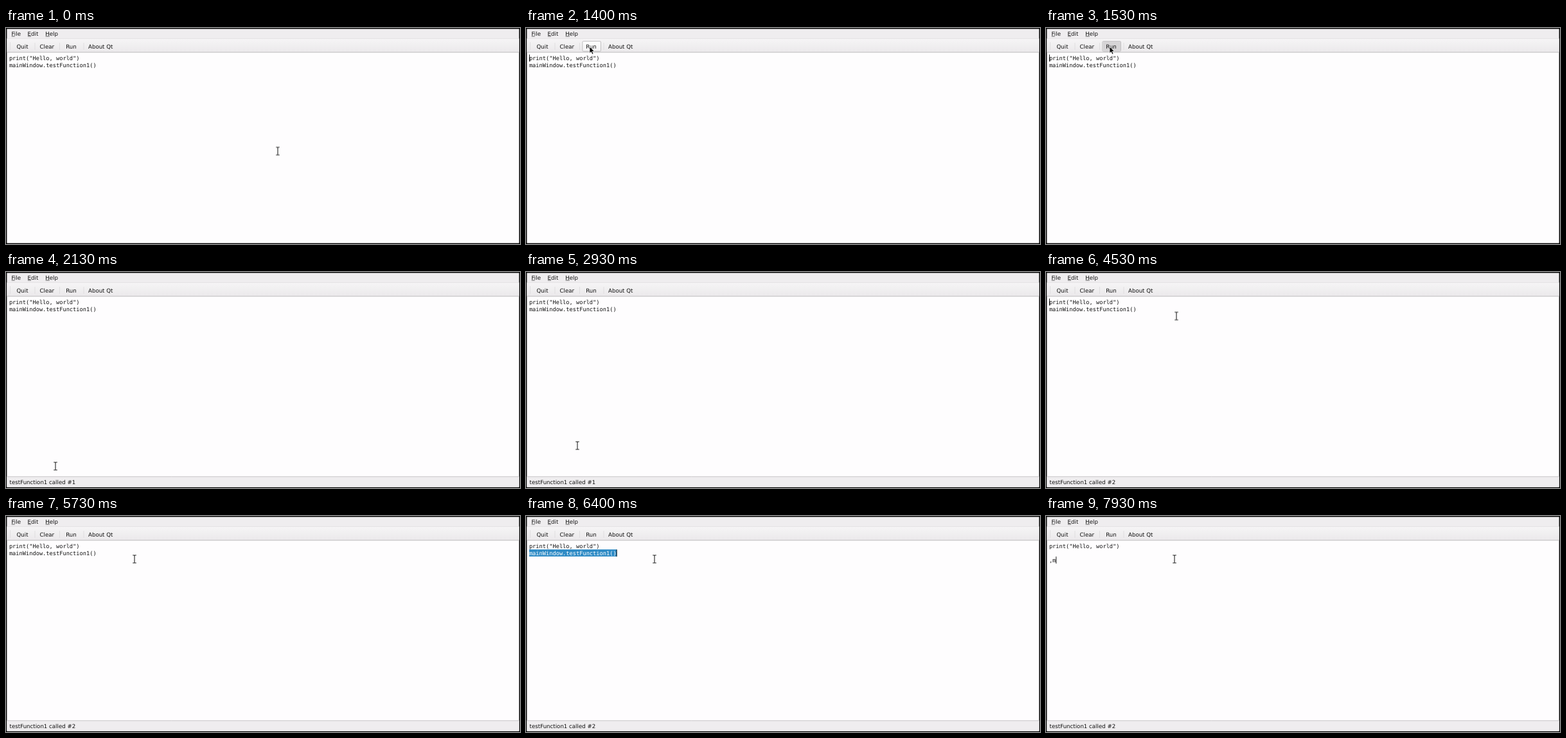
Animation, 800 px wide and 336 px high, one loop 8000 ms. Source, as an HTML page:

```html
<!DOCTYPE html>
<html lang="en">
<head>
<meta charset="utf-8">
<title>Script editor</title>
<style>
html, body { margin: 0; width: 100%; height: 100%; overflow: hidden; background: #000; }
svg { display: block; width: 100%; height: 100%; }
text { font: 8.65px "DejaVu Sans", sans-serif; text-rendering: geometricPrecision; white-space: pre; fill: #111; }
.code text { font: 8.69px "DejaVu Sans Mono", monospace; }
.code .picked { fill: #fff; }

/* Every part changes in hard steps on one 8 s clock. */
.anim { animation: 8s step-end infinite; }
#pointer { animation-name: pointer; }
#beam { animation-name: beam; }
#arrow { animation-name: arrow; }
#hover { animation-name: hover; }
#press { animation-name: press; }
#status { animation-name: status; }
#first { animation-name: first; }
#second { animation-name: second; }
#caret { animation-name: caret; }
#extent { animation-name: extent; }
#call { animation-name: call; }
#typed { animation-name: typed; }
#extra { animation-name: extra; }

@keyframes pointer {
  0% { transform: translate(423px, 191.5px); }
  9.98% { transform: translate(405px, 180px); }
  11.6% { transform: translate(330px, 135px); }
  12.48% { transform: translate(250px, 95px); }
  14.1% { transform: translate(180px, 63px); }
  14.98% { transform: translate(135px, 47px); }
  16.6% { transform: translate(106px, 32px); }
  17.48% { transform: translate(99px, 29px); }
  19.98% { transform: translate(100px, 30px); }
  21.6% { transform: translate(105px, 61px); }
  24.1% { transform: translate(98px, 130px); }
  24.98% { transform: translate(88px, 230px); }
  26.6% { transform: translate(77px, 302px); }
  27.48% { transform: translate(73px, 320px); }
  29.1% { transform: translate(72px, 325px); }
  32.48% { transform: translate(74px, 325px); }
  34.1% { transform: translate(76px, 320px); }
  34.98% { transform: translate(77px, 306px); }
  36.6% { transform: translate(80px, 270px); }
  37.48% { transform: translate(84px, 220px); }
  39.1% { transform: translate(91px, 150px); }
  39.98% { transform: translate(97px, 95px); }
  41.6% { transform: translate(103px, 56px); }
  42.48% { transform: translate(106px, 33px); }
  44.1% { transform: translate(107px, 25px); }
  44.98% { transform: translate(107px, 24px); }
  49.1% { transform: translate(112px, 30px); }
  49.98% { transform: translate(142px, 51px); }
  51.6% { transform: translate(200px, 72px); }
  52.48% { transform: translate(239px, 81px); }
  54.1% { transform: translate(228px, 77px); }
  54.98% { transform: translate(212px, 71px); }
  56.6% { transform: translate(203px, 68.5px); }
  57.48% { transform: translate(201px, 67.5px); }
  59.1%, 100% { transform: translate(200px, 67px); }
}
@keyframes beam {
  0%, 21.6%, 34.98%, 49.98%, 100% { opacity: 1; }
  16.6%, 27.48%, 42.48% { opacity: 0; }
  41.6% { opacity: 1; }
}
@keyframes arrow {
  0%, 21.6%, 34.98%, 49.98%, 100% { opacity: 0; }
  16.6%, 27.48%, 42.48% { opacity: 1; }
}
@keyframes hover {
  0%, 21.6%, 49.98%, 100% { opacity: 0; }
  16.6%, 42.48% { opacity: 1; }
}
@keyframes press {
  0%, 19.98%, 47.48%, 100% { opacity: 0; }
  19.1%, 46.6% { opacity: 1; }
}
@keyframes status { 0% { opacity: 0; } 19.98%, 100% { opacity: 1; } }
@keyframes first { 0% { opacity: 1; } 47.48%, 100% { opacity: 0; } }
@keyframes second { 0% { opacity: 0; } 47.48%, 100% { opacity: 1; } }
@keyframes caret {
  0% { opacity: 0; transform: none; }
  1.6% { opacity: 1; transform: none; }
  9.98% { opacity: 0; transform: none; }
  14.98% { opacity: 1; transform: none; }
  21.6% { opacity: 0; transform: none; }
  28.2% { opacity: 1; transform: none; }
  34.98% { opacity: 0; transform: none; }
  41.6% { opacity: 1; transform: none; }
  48.2% { opacity: 0; transform: none; }
  54.98% { opacity: 1; transform: none; }
  59.1% { opacity: 0; transform: none; }
  61.6% { opacity: 1; transform: translate(0, 21.8px); }
  67.48% { opacity: 1; transform: translate(0, 10.9px); }
  71.6% { opacity: 0; transform: translate(0, 10.9px); }
  74.1% { opacity: 1; transform: translate(21px, 10.9px); }
  74.98% { opacity: 1; transform: translate(42px, 10.9px); }
  76.6% { opacity: 1; transform: translate(68px, 10.9px); }
  77.48% { opacity: 1; transform: translate(89px, 10.9px); }
  79.1% { opacity: 1; transform: translate(115px, 10.9px); }
  79.98% { opacity: 1; transform: translate(135.6px, 10.9px); }
  86.6% { opacity: 1; transform: translate(0, 10.9px); }
  89.1% { opacity: 1; transform: translate(0, 21.8px); }
  91.6% { opacity: 0; transform: translate(0, 21.8px); }
  94.1% { opacity: 1; transform: translate(10.3px, 21.8px); }
  96.6% { opacity: 1; transform: translate(15.5px, 21.8px); }
  99.1%, 100% { opacity: 1; transform: translate(10.3px, 21.8px); }
}
@keyframes extent {
  0% { width: 0; }
  74.1% { width: 21px; }
  74.98% { width: 42px; }
  76.6% { width: 68px; }
  77.48% { width: 89px; }
  79.1% { width: 115px; }
  79.98%, 100% { width: 136.4px; }
}
@keyframes call { 0% { opacity: 1; } 86.6%, 100% { opacity: 0; } }
@keyframes typed { 0% { opacity: 0; } 94.1%, 100% { opacity: 1; } }
@keyframes extra { 0%, 99.1%, 100% { opacity: 0; } 96.6% { opacity: 1; } }
</style>
</head>
<body>
<svg viewBox="0 0 800 336">
  <defs>
    <linearGradient id="bar" x2="0" y2="1">
      <stop stop-color="#f6f5f6"/>
      <stop offset="1" stop-color="#ebe9eb"/>
    </linearGradient>
    <linearGradient id="button" x2="0" y2="1">
      <stop stop-color="#fefefe"/>
      <stop offset="1" stop-color="#f4f3f4"/>
    </linearGradient>
    <clipPath id="selection"><rect id="extent" class="anim" x="5" y="52" height="11" width="0"/></clipPath>
  </defs>

  <rect width="800" height="336"/>
  <rect x="1.4" y="1.4" width="797.2" height="333.2" fill="#efedef"/>

  <g id="menu">
    <text x="8.5" y="11.6">File</text>
    <text x="33.6" y="11.6">Edit</text>
    <text x="61.3" y="11.6">Help</text>
    <path d="M8.7 13h5M33.9 13h5.2M61.6 13h6.2" stroke="#222" stroke-width=".7"/>
  </g>

  <g id="toolbar">
    <rect x="1.4" y="16.6" width="797.2" height="20.6" fill="url(#bar)"/>
    <path d="M1.4 16.5H798.6" stroke="#dddbdd" stroke-width=".6"/>
    <path d="M6.5 22V34M45 23V34M83.5 23V34M121 23V34" stroke="#d9d7d9" stroke-width=".7"/>
    <g id="hover" class="anim" opacity="0">
      <rect x="87.9" y="20.6" width="28.6" height="15.6" rx="1.4" fill="url(#button)" stroke="#b2b0b2" stroke-width=".8"/>
      <rect id="press" class="anim" x="88.3" y="21" width="27.8" height="14.8" rx="1" fill="#d6d4d6" opacity="0"/>
    </g>
    <text x="16.5" y="31.8">Quit</text>
    <text x="52.6" y="31.8">Clear</text>
    <text x="93.2" y="31.8">Run</text>
    <text x="128" y="31.8">About Qt</text>
  </g>

  <rect x="1.4" y="37.2" width="797.2" height="1.3" fill="#c2c0c2"/>
  <rect x="1.9" y="38.5" width="796.2" height="295.8" fill="#fefdfe"/>

  <g class="code">
    <text x="4.9" y="50">print("Hello, world")</text>
    <g id="call" class="anim">
      <text x="4.9" y="60.8">mainWindow.testFunction1()</text>
      <g clip-path="url(#selection)">
        <rect x="5" y="52" width="137" height="11" fill="#308cc6"/>
        <text class="picked" x="4.9" y="60.8">mainWindow.testFunction1()</text>
      </g>
    </g>
    <text id="typed" class="anim" x="4.9" y="71.8" opacity="0">,m</text>
    <text id="extra" class="anim" x="15.36" y="71.8" opacity="0">a</text>
    <rect id="caret" class="anim" x="5.1" y="41.3" width=".9" height="10.9" opacity="0"/>
  </g>

  <g id="status" class="anim" opacity="0">
    <rect x="1.4" y="318" width="797.2" height="16.6" fill="#efedef"/>
    <path d="M1.4 318.3H798.6" stroke="#bebcbe" stroke-width=".8"/>
    <text id="first" class="anim" x="5.6" y="330">testFunction1 called #1</text>
    <text id="second" class="anim" x="5.6" y="330" opacity="0">testFunction1 called #2</text>
  </g>

  <g id="pointer" class="anim">
    <g id="beam" class="anim" fill="none">
      <path d="M-3 -6H3M-3 6H3M0 -6V6" stroke="#fff" stroke-width="2.2"/>
      <path d="M-2.8 -6H-.6L0 -5.4L.6 -6H2.8M-2.8 6H-.6L0 5.4L.6 6H2.8M0 -5.4V5.4" stroke="#222" stroke-width="1.1"/>
    </g>
    <path id="arrow" class="anim" opacity="0" d="M0 0V10.2L2.4 8L4.1 11.9L5.9 11.1L4.2 7.3H7.4Z" fill="#000" stroke="#fff" stroke-width=".7"/>
  </g>
</svg>
</body>
</html>
```
